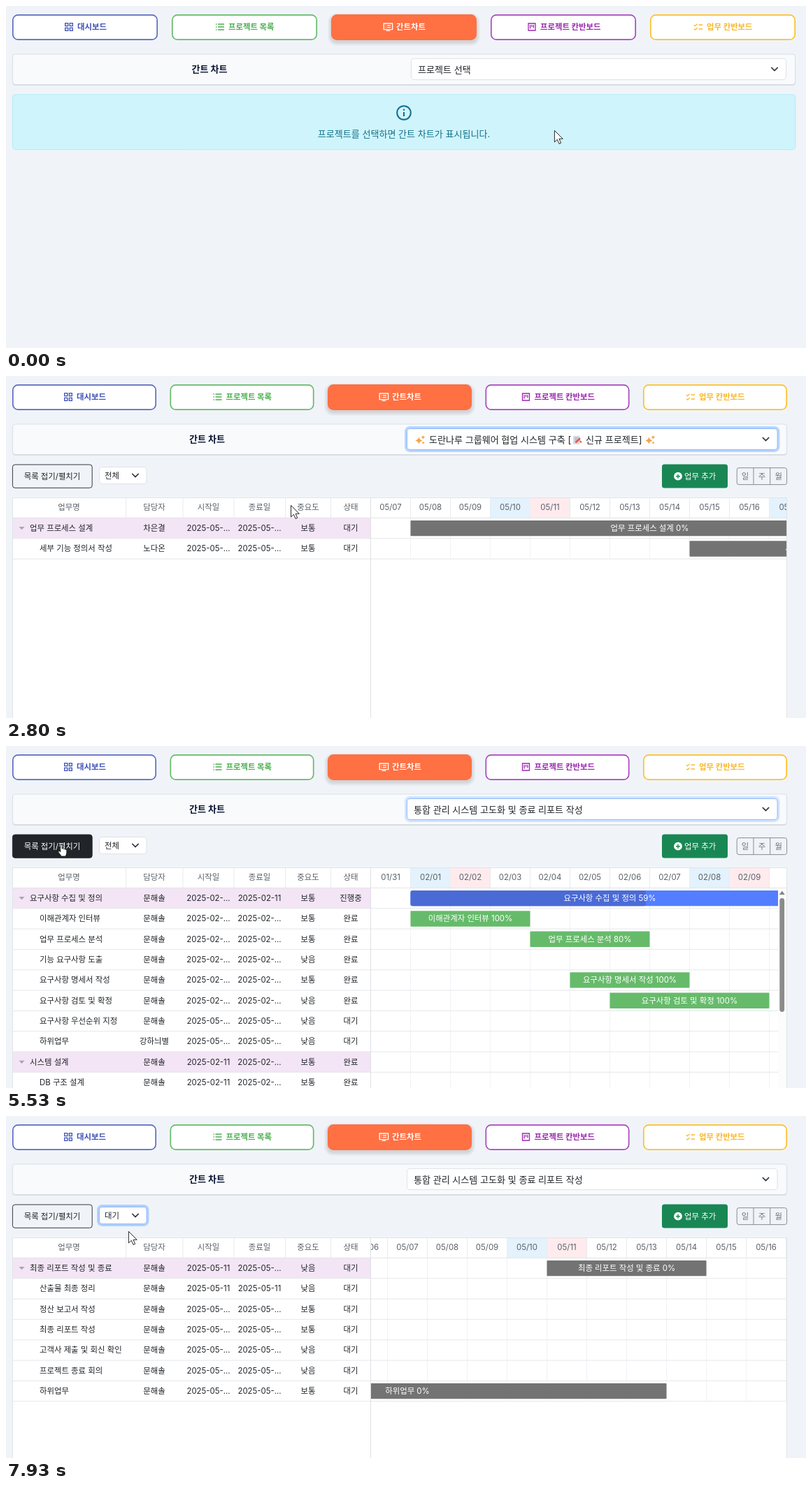
An HTML page that plays this animation: 1144x490 px, repeating every 8 s.

```html
<!DOCTYPE html>
<html lang="ko">
<head>
<meta charset="utf-8">
<title>간트 차트</title>
<style>
  html, body { margin: 0; width: 100%; height: 100%; overflow: hidden; background: #f0f4f9; }
  svg { display: block; width: 1144px; height: 490px; font-family: Inter, "Noto Sans CJK KR", "Noto Sans CJK JP", "Noto Sans CJK", sans-serif; }
</style>
</head>
<body>
<svg id="stage" viewBox="0 0 1144 490"></svg>
<script>
const LOOP = 8000, DAY_W = 57, ROW_H = 29.33, ROWS_TOP = 203.2, OPTION_H = 19;
const stage = document.getElementById('stage');

const clamp = v => Math.min(1, Math.max(0, v));
const ramp = (t, from, to) => clamp((t - from) / (to - from));
const range = n => Array.from({ length: n }, (_, i) => i);

// Shapes: text is placed by its vertical centre.
const text = (x, y, s, fill = '#212529', { size = 11.4, anchor = 'middle', weight = 400 } = {}) =>
  `<text x="${x}" y="${(y + size * 0.365).toFixed(2)}" font-size="${size}" font-weight="${weight}" fill="${fill}" text-anchor="${anchor}">${s}</text>`;
const left = (x, y, s, fill, size = 11.4, weight = 400) => text(x, y, s, fill, { size, weight, anchor: 'start' });
const rect = (x, y, w, h, fill, extra = '') =>
  `<rect x="${x}" y="${y}" width="${w}" height="${h}" fill="${fill}" ${extra}/>`;
const path = (d, stroke, width = 1, extra = 'fill="none"') =>
  `<path d="${d}" stroke="${stroke}" stroke-width="${width}" ${extra}/>`;
const at = (x, y, s) => `<g transform="translate(${x} ${y})">${s}</g>`;
const chevron = (x, y) =>
  path(`M${x - 4.2} ${y - 2.1}l4.2 4.2l4.2 -4.2`, '#343a40', 1.6, 'fill="none" stroke-linecap="round" stroke-linejoin="round"');
const shadow = (x, y, w, h, r, steps = 4, dy = 3) => range(steps).map(i =>
  rect(x - i, y + dy - i, w + 2 * i, h + 2 * i, '#000', `rx="${r + i}" opacity=".025"`)).join('');

// Navigation
const ICONS = [
  'M.7 .7h4v4h-4zM7.3 .7h4v4h-4zM.7 7.3h4v4h-4zM7.3 7.3h4v4h-4z',
  'M0 2h1.4M0 6h1.4M0 10h1.4M3 2h9M3 6h9M3 10h9',
  'M.2 1h12.4v8.6h-12.4zM3.6 11.4h5.6M2.6 3.8h1M5 3.8h5.2M2.6 6.6h1M5 6.6h5.2',
  'M1 1h10v10h-10zM3.6 3v5.4M6 3v3M8.4 3v4.4',
  'M0 3l1.6 1.6l3 -3M0 8.6l1.6 1.6l3 -3M6.6 3h5.4M6.6 9h5.4'
];
const NAV = [
  ['대시보드', '#3f51b5', '#5c6bc0', 11],
  ['프로젝트 목록', '#4caf50', '#66bb6a', 23],
  ['간트차트', '#fff', '#ff7043', 11],
  ['프로젝트 칸반보드', '#9c27b0', '#ab47bc', 33],
  ['업무 칸반보드', '#fbb829', '#fbc02d', 23]
];
function nav(wide) {
  const pitch = wide ? 228 : 225.5, w = wide ? 208 : 206;
  return NAV.map(([label, ink, edge, half], i) => {
    const x = 9 + pitch * i, textX = x + w / 2 - half, active = i === 2;
    return (active ? shadow(x, 12, w, 37, 8, 6) : '') +
      rect(x + .8, 12.8, w - 1.6, 35.4, active ? edge : '#fff', `rx="7.5" stroke="${edge}" stroke-width="1.7"`) +
      at(textX - 18, 24, path(ICONS[i], ink, 1.3)) + left(textX, 30.3, label, ink, 11.4, 700);
  }).join('');
}

// Project select
const SPARKLE = [[5.4, 8, 5.2], [11.4, 3.4, 2.8], [11.6, 11.2, 2.2]].map(([x, y, r]) =>
  `<path d="M${x} ${y - r}q${r * .2} ${r * .8} ${r} ${r}q${-r * .8} ${r * .2} ${-r} ${r}q${-r * .2} ${-r * .8} ${-r} ${-r}q${r * .8} ${-r * .2} ${r} ${-r}z" fill="#f5a54a"/>`).join('');
const MEMO = rect(1, .8, 9.6, 12, '#d3dae3', 'rx="1"') + path('M3 4h5.5M3 6.5h5M3 9h3', '#8e9bab', .8) +
  path('M4.5 10.5l6.5 -6.2', '#e2574c', 2.6) + path('M10.6 8l2.2 2.4', '#e2574c', 2);
const groupware = (x, y, fill) => at(x + 2, y - 6.5, SPARKLE) + left(x + 22, y, '도란나루 그룹웨어 협업 시스템 구축 [', fill, 13.05) +
  at(x + 227, y - 6, MEMO) + left(x + 246, y, '신규 프로젝트]', fill, 13.05) + at(x + 331, y - 6.5, SPARKLE);

const AREAS = ['고객 관리', '인사 평가', '재고 관리', '전자 결재', '교육 운영'];
const WORKS = ['시스템 구축', '화면 개선', '데이터 이관', '운영 점검'];
const PROJECTS = ['프로젝트 선택', groupware, '사내 업무 포털 개편', '통합 관리 시스템 고도화 및 종료 리포트 작성',
  ...range(17).map(i => `${AREAS[i % 5]} ${WORKS[i % 4]}`)];
const STATES = ['전체', '대기', '진행중', '완료', '보류'];

const option = (x, y, item, fill, size) => typeof item === 'function' ? item(x, y, fill) : left(x, y, item, fill, size);

function select(x, y, w, h, item, size, focus, pad, arrow) {
  const ring = focus && rect(x - 1.3, y - 1.3, w + 2.6, h + 2.6, 'none', `rx="5.5" stroke="#0d6efd" stroke-width="3.2" opacity="${(.27 * focus).toFixed(3)}"`);
  return (ring || '') +
    rect(x + .4, y + .4, w - .8, h - .8, '#fff', `rx="4.5" stroke="${focus > .3 ? '#86b7fe' : '#dee2e6'}"`) +
    option(x + pad, y + h / 2 + .4, item, '#212529', size) + chevron(x + w - arrow, y + h / 2);
}

function popup(x, y, w, items, size, current, pointerY, pad) {
  const hovered = pointerY > y ? Math.floor((pointerY - y) / OPTION_H) : current;
  const h = Math.min(items.length * OPTION_H + 1, 490 - y);
  return shadow(x, y, w, h, 1, 6) + rect(x, y, w, h, '#fff', 'stroke="#c8cdd3"') + items.map((item, i) => {
    const top = y + i * OPTION_H, on = i === hovered;
    return (on ? rect(x + .5, top, w - 1, OPTION_H, '#1967d2') : '') +
      option(x + pad, top + OPTION_H / 2, item, on ? '#fff' : '#212529', size);
  }).join('');
}

function titleCard(wide, project, focus) {
  const w = wide ? 1120 : 1108;
  return rect(9.4, 70, w - .8, 43.6, '#c3c9d0', 'rx="4"') +
    rect(9.4, 69, w - .8, 43.5, '#f8fafc', 'rx="4" stroke="#d9dde3" stroke-width=".9"') +
    text(wide ? 291 : 287.5, 90.5, '간트 차트', '#0b1533', { size: 13.05, weight: 700 }) +
    select(wide ? 579 : 573, 75, wide ? 537 : 530.5, 31, PROJECTS[project], 13.05, focus, 10, 17);
}

// Page bodies
const notice = () => rect(9.4, 126.8, 1119.4, 79, '#cff4fc', 'rx="4" stroke="#aeeaf6" stroke-width=".9"') +
  '<circle cx="569" cy="153" r="9.8" fill="none" stroke="#12708a" stroke-width="2"/>' +
  path('M569 152v6M569 147.6v2.2', '#12708a', 2.1) +
  text(569, 183.3, '프로젝트를 선택하면 간트 차트가 표시됩니다.', '#12708a', { size: 13.05 });

const loading = age => `<circle cx="569" cy="178.5" r="11.4" fill="none" stroke="#5c667f" stroke-width="3.3" pathLength="4" stroke-dasharray="3 1" transform="rotate(${(45 + age * .48).toFixed(1)} 569 178.5)"/>` +
  text(569, 218, '간트차트를 불러오는 중...', '#666d78', { size: 13.05 });

function toolbar(filter, filterFocus, hover) {
  const c = Math.round(33 + 222 * hover);
  return rect(9.4, 127, 113.8, 33.3, '#212529', `rx="3.5" fill-opacity="${hover}" stroke="#212529" stroke-width=".9"`) +
    text(66, 143.8, '목록 접기/펼치기', `rgb(${c},${c},${c})`) +
    select(133, 130, 68.5, 25, STATES[filter], 11.4, filterFocus, 8, 16.5) +
    rect(938, 126.5, 94, 34, '#198754', 'rx="3.5"') +
    '<circle cx="961" cy="143.7" r="5.9" fill="#fff"/>' + path('M958 143.7h6M961 140.7v6', '#198754', 1.4) +
    left(970, 143.8, '업무 추가', '#fff') +
    rect(1045.2, 131.6, 71.4, 24, 'none', 'rx="3" stroke="#7a838b" stroke-width=".9"') +
    path('M1069 131.6v24M1092.7 131.6v24', '#7a838b', .9) +
    ['일', '주', '월'].map((s, i) => text(1057 + i * 23.9, 143.8, s, '#6c757d')).join('');
}

// Gantt data; a bar is [first day column, days, percent].
const task = (name, start, end, priority, state, bar, more) =>
  ({ name, start, end, priority, state, bar, who: '문해솔', ...more });
const parent = { parent: true };
const CHARTS = {
  design: { first: '2025-05-07', shift: 0, rows: [
    task('업무 프로세스 설계', '05', '05', '보통', '대기', [1, 12, 0], { parent: true, who: '차은결' }),
    task('세부 기능 정의서 작성', '05', '05', '보통', '대기', [8, 7, 0], { who: '노다온' })
  ] },
  upgrade: { first: '2025-01-31', shift: 0, scroll: true, rows: [
    task('요구사항 수집 및 정의', '02', '02-11', '보통', '진행중', [1, 10, 59], parent),
    task('이해관계자 인터뷰', '02', '02', '보통', '완료', [1, 3, 100]),
    task('업무 프로세스 분석', '02', '02', '보통', '완료', [4, 3, 80]),
    task('기능 요구사항 도출', '02', '02', '낮음', '완료', [11, 3, 100]),
    task('요구사항 명세서 작성', '02', '02', '보통', '완료', [5, 3, 100]),
    task('요구사항 검토 및 확정', '02', '02', '낮음', '완료', [6, 4, 100]),
    task('요구사항 우선순위 지정', '05', '05', '낮음', '대기'),
    task('하위업무', '05', '05', '낮음', '대기', null, { who: '강하늬별' }),
    task('시스템 설계', '02-11', '02', '보통', '완료', [11, 8, 100], parent),
    task('DB 구조 설계', '02-11', '02', '보통', '완료', [11, 3, 100])
  ] },
  waiting: { first: '2025-05-06', shift: -33, rows: [
    task('최종 리포트 작성 및 종료', '05-11', '05', '낮음', '대기', [5, 4, 0], parent),
    task('산출물 최종 정리', '05-11', '05-11', '낮음', '대기'),
    task('정산 보고서 작성', '05', '05', '보통', '대기'),
    task('최종 리포트 작성', '05', '05', '보통', '대기'),
    task('고객사 제출 및 회신 확인', '05', '05', '낮음', '대기'),
    task('프로젝트 종료 회의', '05', '05', '낮음', '대기'),
    task('하위업무', '05', '05', '보통', '대기', [-5, 13, 0])
  ] }
};
const BAR_FILL = { 대기: '#737373', 완료: '#66bb6a', 진행중: '#537eff' };
const WEEKEND = { 6: '#e3f2fd', 0: '#ffebee' };
const HEADS = [['업무명', 90, 171.5], ['담당자', 212, 253], ['시작일', 289.5, 326], ['종료일', 362.5, 399.5], ['중요도', 432, 464.5], ['상태', 493, 521.5]];
const shortDate = d => `2025-${d.length > 2 ? d : d + '-...'}`;

function gridRow(r, i, hovered) {
  const y = ROWS_TOP + ROW_H * i, c = y + ROW_H / 2;
  const fill = r.parent ? '#f3e5f5' : hovered ? '#eff3ff' : '#fff';
  const cells = [r.who, shortDate(r.start), shortDate(r.end), r.priority, r.state];
  return rect(9.5, y + .3, 512, ROW_H, fill) +
    (r.parent ? `<path d="M18.5 ${c - 1.8}h8l-4 4.2z" fill="#a9a3ad"/>` : '') +
    left(r.parent ? 34 : 48, c, r.name) + cells.map((s, k) => text(HEADS[k + 1][1], c, s)).join('');
}

function bar(r, i, x0) {
  if (!r.bar) return '';
  const [from, days, pct] = r.bar, x = x0 + from * DAY_W, w = days * DAY_W, y = ROWS_TOP + ROW_H * i + 3.7;
  return rect(x, y, w, 22.4, BAR_FILL[r.state], `rx="${r.state === '진행중' ? 3 : 1}"`) +
    (r.state === '진행중' ? rect(x, y, w * pct / 100, 22.4, '#4a6ad6', 'rx="3"') : '') +
    text(x + w / 2, y + 11, `${r.name} ${pct}%`, '#fff');
}

function gantt(chart, { blank, gridOpen = true, pointer }) {
  const rows = blank ? [] : chart.rows, x1 = gridOpen ? 521.5 : 9.5;
  const x2 = chart.scroll && !blank ? 1104 : 1116.5, x0 = x1 + chart.shift;
  const start = Date.parse(chart.first), bottom = ROWS_TOP + ROW_H * rows.length;
  const days = range(Math.ceil((x2 - x0) / DAY_W)).map(i => {
    const date = new Date(start + i * 864e5), x = x0 + i * DAY_W, tint = WEEKEND[date.getUTCDay()];
    return (tint ? rect(x, 174.5, DAY_W, 28.8, tint) : '') +
      text(x + DAY_W / 2, 188.3, date.toISOString().slice(5, 10).replace('-', '/'), '#5a6068') +
      path(`M${x + DAY_W} 174.5V203.5`, '#e6e8ea', .9) + path(`M${x + DAY_W} 203.5V${bottom}`, '#f0f1f2', .9);
  }).join('');
  const hoverRow = pointer[0] < 521 ? Math.floor((pointer[1] - ROWS_TOP) / ROW_H) : -1;
  const grid = rows.map((r, i) => gridRow(r, i, i === hoverRow)).join('') +
    HEADS.map(([s, x, edge]) => text(x, 188.3, s, '#5a6068') + path(`M${edge} 174.5V203.5`, '#e6e8ea', .9)).join('');
  const lines = range(rows.length).map(i => path(`M9.5 ${ROWS_TOP + ROW_H * (i + 1) + .2}H${x2}`, '#e3e5e8', .9)).join('');
  return `<clipPath id="timeline"><rect x="${x1}" y="174" width="${x2 - x1}" height="316"/></clipPath>` +
    rect(9, 174, 1108, 330, '#fff') +
    `<g clip-path="url(#timeline)">${days}</g>` + (gridOpen ? grid : '') + lines +
    path('M9.5 203.3H1116.5', '#dfe1e4', .9) +
    `<g clip-path="url(#timeline)">${rows.map((r, i) => bar(r, i, x0)).join('')}</g>` +
    (gridOpen ? path('M521.5 174V490', '#dcdee1', .9) : '') +
    (chart.scroll && !blank ? rect(1104, 204, 12.5, 290, '#fcfcfc') + '<path d="M1105.8 213l4 -5.4l4 5.4z" fill="#858585"/>' +
      rect(1106.3, 218, 6.8, 163, '#8b8b8b', 'rx="3.4"') : '') +
    rect(9.4, 174.4, 1107.2, 330, 'none', 'stroke="#dfe1e4" stroke-width=".9"');
}

// Pointer: [ms, x, y]
const PATH = [
  [20, 784, 178], [400, 683, 91], [600, 683, 91], [1200, 678, 137], [1610, 678, 137], [1870, 701, 143], [2020, 701, 143],
  [2400, 450, 235], [2580, 385, 262], [2800, 407, 185], [2870, 563, 168], [2900, 563, 168], [3130, 685, 88], [3400, 685, 88],
  [3870, 674, 169], [4230, 674, 169], [4330, 626, 200], [4430, 626, 200], [4830, 320, 142], [5100, 135, 165], [5270, 74, 165],
  [5420, 79, 141], [5560, 79, 141], [5870, 91, 144], [6210, 91, 144], [6560, 124, 147], [7000, 177, 144], [7100, 177, 144],
  [7450, 180, 183], [7670, 180, 183], [7880, 175, 165]
];
function pointerAt(t) {
  const next = PATH.findIndex(k => k[0] > t);
  if (next === 0) return PATH[0].slice(1);
  if (next < 0) return PATH[PATH.length - 1].slice(1);
  const [a, b] = [PATH[next - 1], PATH[next]], u = ramp(t, a[0], b[0]), e = u * u * (3 - 2 * u);
  return [1, 2].map(i => +(a[i] + (b[i] - a[i]) * e).toFixed(1));
}
const ARROW = path('M.4 .4V17L4.3 13.3L7 19.4L9.6 18.3L7 12.3H12.2Z', '#111', .9, 'fill="#fff" stroke-linejoin="round"');
const HAND = path('M-1.2 1Q0 -1 1.2 1V6.2Q2.6 5.2 3.6 6.6Q5 5.8 5.8 7.2Q7.6 6.8 7.8 8.6V12Q7.6 14.4 6.6 15.6V17H-.6V15.6Q-2.6 13.6 -4.2 10.8Q-4.4 8.8 -2.6 9.4L-1.2 11Z', '#111', .8, 'fill="#fff" stroke-linejoin="round"');

function body(t, pointer) {
  if (t < 1600) return notice();
  if (t < 1800) return loading(t - 1600);
  if (t >= 4070 && t < 4130) return loading(t - 4070);
  const chart = t < 4070 ? CHARTS.design : t < 7730 ? CHARTS.upgrade : CHARTS.waiting;
  const blank = t < 1870 || (t >= 4130 && t < 4270);
  const hover = ramp(t, 5300, 5450) - ramp(t, 6560, 6710);
  return toolbar(t < 7670 ? 0 : 1, ramp(t, 7050, 7200), hover) +
    gantt(chart, { blank, gridOpen: t < 5670 || t >= 6200, pointer });
}

function scene(t) {
  const pointer = pointerAt(t);
  const wide = t < 1800 || (t >= 4070 && t < 4130);
  const project = t < 1600 ? 0 : t < 4070 ? 1 : 3;
  const focus = ramp(t, 580, 720) - ramp(t, 5450, 5640);
  let out = nav(wide) + titleCard(wide, project, focus) + body(t, pointer);
  if (t >= 600 && t < 1600) out += popup(579, 106.5, 537, PROJECTS, 13.05, 0, pointer[1], 10);
  if (t >= 3400 && t < 4070) out += popup(573, 106.5, 530.5, PROJECTS, 13.05, 1, pointer[1], 10);
  if (t >= 7070 && t < 7670) out += popup(133, 155.5, 68.5, STATES, 11.4, 0, pointer[1], 8);
  return out + at(...pointer, t >= 5310 && t < 6560 ? HAND : ARROW);
}

let shown = '';
function frame(now) {
  const html = scene(now % LOOP);
  if (html !== shown) stage.innerHTML = shown = html;
  requestAnimationFrame(frame);
}
frame(0);
</script>
</body>
</html>
```
